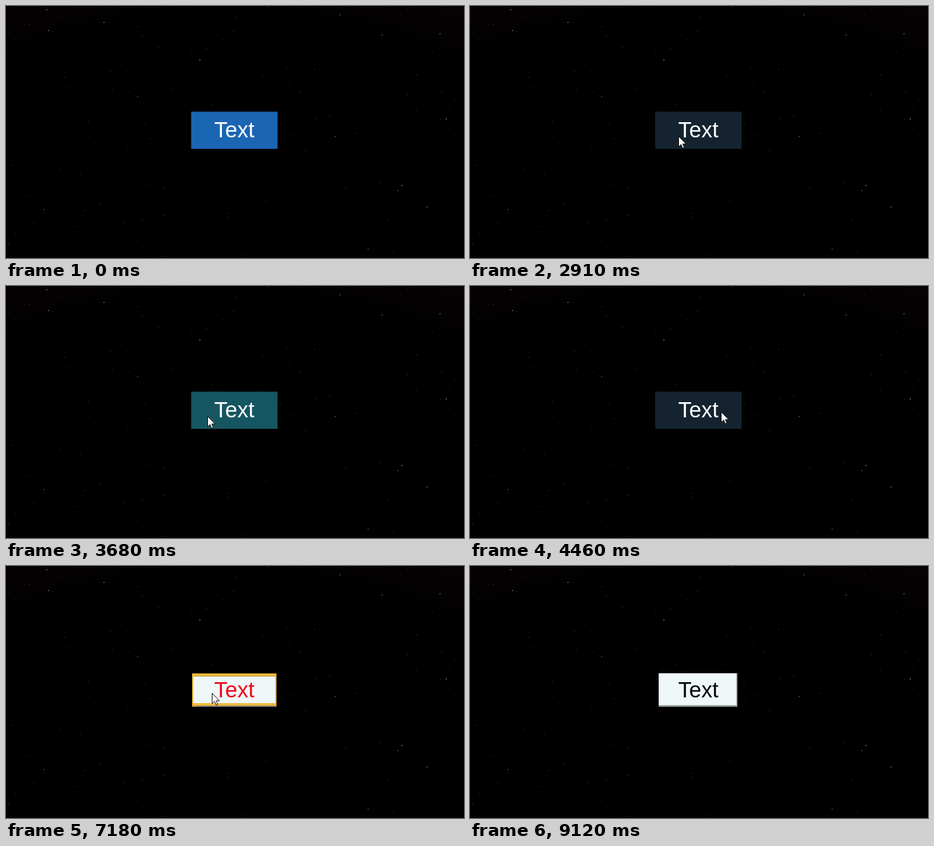
Animation of 721 by 397 pixels, one loop 9420 ms. Source, as an HTML page with a canvas:

```html
<!DOCTYPE html>
<html lang="en">
<head>
<meta charset="utf-8">
<title>Button states</title>
<style>
  html, body { margin: 0; width: 100%; height: 100%; overflow: hidden; background: #000; }
  canvas { display: block; }
</style>
</head>
<body>
<canvas id="stage" width="721" height="397"></canvas>
<script>
const W = 721, H = 397, LOOP = 9420;
const STEP = 77;           // the pointer advances once per step
const RESTYLE = 4610;      // the flat button gives way to the raised one
const ctx = document.getElementById('stage').getContext('2d');
const sky = makeSky();
const arrow = new Path2D('M.5.5V16.8L4.2 13.2 6.8 19 9.3 18 6.8 12.3H12Z');

// Each stroke is a quadratic curve; without a bend it is straight.
const strokes = [
  { start: 300, end: 840, from: [577, 378], bend: [540, -62], to: [410, 107] },
  { start: 1070, end: 1300, from: [398, 130], to: [332, 189] },
  { start: 1450, end: 1610, from: [332, 189], to: [329, 193] },
  { start: 1990, end: 2530, from: [300, 153], bend: [130, 285], to: [329, 205] },
  { start: 3140, end: 3530, from: [329, 205], to: [318, 205] },
  { start: 3920, end: 4460, from: [318, 205], to: [396, 198] },
  { start: 4530, end: 4531, from: [490, 318], to: [490, 318] },
  { start: 6160, end: 6780, from: [580, 38], bend: [420, 150], to: [325, 200] },
  { start: 7870, end: 8490, from: [336, 196], bend: [550, -80], to: [388, 190] },
  { start: 8720, end: 9040, from: [425, 208], to: [668, 380] }
];

const within = (v, a, b) => v >= a && v < b;
const mix = (a, b, u) => a.map((v, i) => v + (b[i] - v) * u);

function makeSky() {
  const layer = document.createElement('canvas');
  layer.width = W;
  layer.height = H;
  const g = layer.getContext('2d');
  const glow = g.createRadialGradient(345, 915, 890, 345, 915, 980);
  glow.addColorStop(0, '#000');
  glow.addColorStop(1, '#070203');
  g.fillStyle = glow;
  g.fillRect(0, 0, W, H);
  g.fillStyle = '#080203';
  g.fillRect(0, 393, W, 4);

  let seed = 41;
  const random = () => (seed = seed * 16807 % 2147483647) / 2147483647;
  for (let i = 0; i < 380; i++) {
    const light = 22 + 65 * random() ** 3;
    g.fillStyle = `rgb(${light},${light},${light + 4})`;
    g.fillRect(random() * W | 0, random() * H | 0, 1, 1);
  }
  const bright = (color, halo, places) => places.forEach(([x, y]) => {
    g.fillStyle = halo;
    g.fillRect(x - 1, y, 2, 2);
    g.fillStyle = color;
    g.fillRect(x, y, 1, 1);
  });
  bright('#aaa', '#333', [[64, 5], [67, 38], [154, 25], [683, 43], [305, 84], [693, 177], [623, 282]]);
  bright('#666', '#222', [[207, 142], [518, 205], [617, 290], [60, 320], [570, 382]]);
  bright('#6478d8', '#1c2555', [[526, 13], [592, 45], [663, 316]]);
  return layer;
}

function pointerAt(t) {
  if (!within(t, 300, RESTYLE) && !within(t, 6160, 9120)) return null;
  const { start, end, from, to, bend = mix(from, to, 0.5) } = strokes.findLast(s => t >= s.start);
  const steps = Math.max(1, Math.round((end - start) / STEP));
  const u = Math.min(1, Math.floor((t - start) / (end - start) * steps + 0.1) / steps);
  return mix(mix(from, bend, u), mix(bend, to, u), u).map(Math.round);
}

// Two bursts of clicks at a steady rhythm.
function pressedAt(t) {
  const burst = (start, end, period) => within(t, start, end) && (t - start) % period < 165;
  return burst(2680, 3900, 333) || burst(7010, 7900, 395);
}

function rect(color, x, y, w, h) {
  ctx.fillStyle = color;
  ctx.fillRect(x, y, w, h);
}

function label(color) {
  ctx.font = '34.5px "Liberation Sans", Arial, sans-serif';
  ctx.textAlign = 'center';
  ctx.fillStyle = color;
  ctx.fillText('Text', 359.5, 206.5);
}

function flatButton(hover, pressed) {
  rect(!hover ? '#1b66b3' : pressed ? '#165662' : '#152330', 291.5, 166.5, 136, 58.5);
  label('#fff');
}

function raisedButton(highlight, textColor) {
  if (highlight) {
    rect('#b98a2c', 293, 169, 133, 53);
    rect('#f0bd3c', 293, 170, 132, 50);
    rect('#b98a2c', 295, 173, 130, 1);
    rect('#eff7f8', 295, 174, 129, 42);
    rect('#777', 300, 220, 125, 2);
  } else {
    rect('#858989', 297, 169, 124, 53);
    rect('#b8bebe', 297, 169, 123, 51);
    rect('#eff7f8', 297, 169, 122, 50);
  }
  label(textColor);
}

function drawPointer([x, y]) {
  ctx.save();
  ctx.translate(x - 1, y);
  ctx.fillStyle = '#fff';
  ctx.strokeStyle = '#100808';
  ctx.fill(arrow);
  ctx.stroke(arrow);
  ctx.restore();
}

function draw(now) {
  const t = now % LOOP;
  const pointer = pointerAt(t);
  const hover = pointer && within(pointer[0], 291, 428) && within(pointer[1], 166, 225);
  const pressed = pressedAt(t);

  ctx.drawImage(sky, 0, 0);
  if (t < RESTYLE) flatButton(hover, pressed);
  else {
    const highlight = hover && !pressed;
    raisedButton(highlight, t < 5070 ? '#fff' : highlight ? '#f00519' : '#05050c');
  }
  if (pointer) drawPointer(pointer);
  requestAnimationFrame(() => draw(performance.now() - begin));
}

const begin = performance.now();
draw(0);
</script>
</body>
</html>
```
